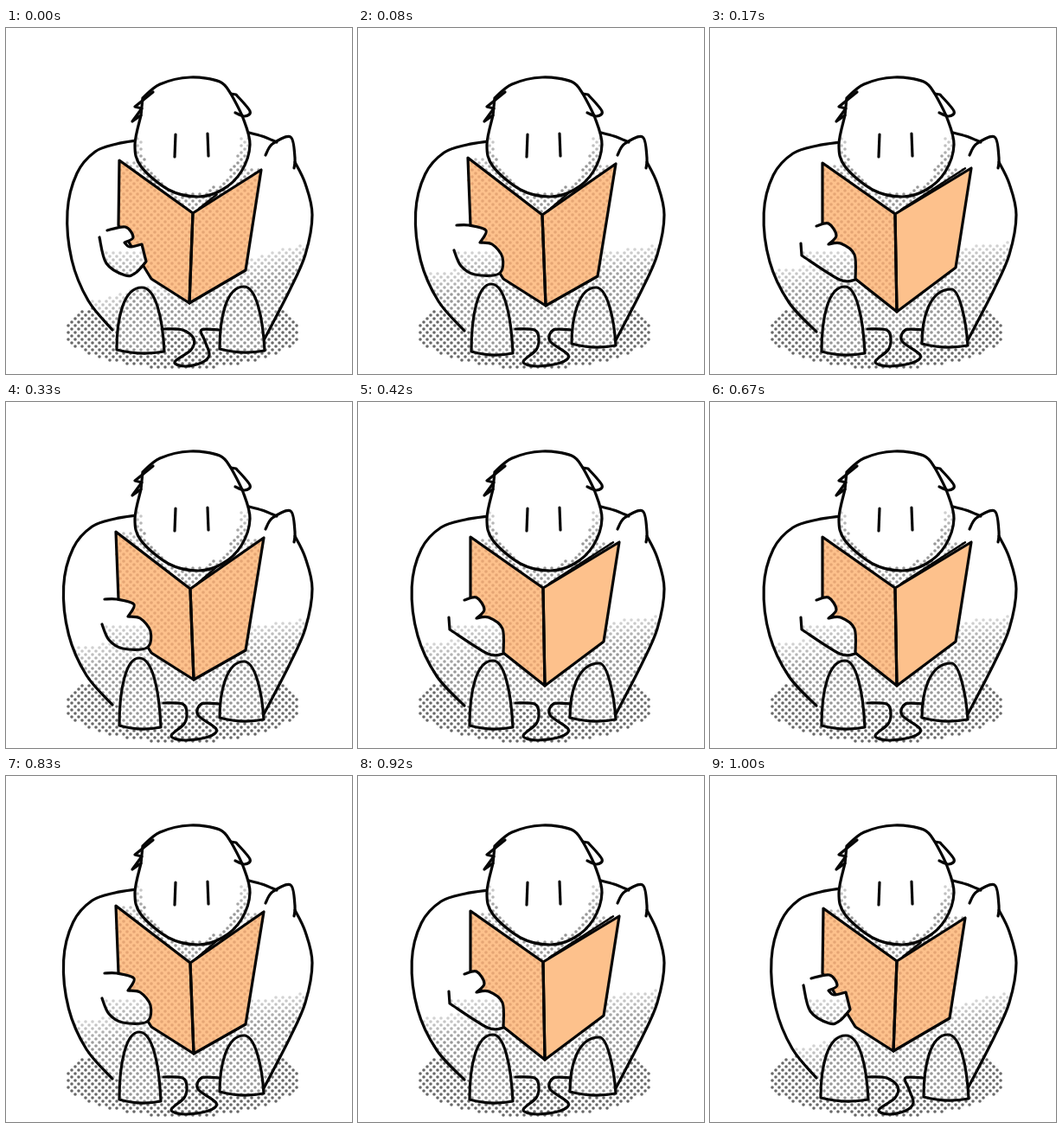
These frames come from a looping animation (400 px wide and 400 px high, 1.08 s). An HTML page with a canvas:

```html
<!DOCTYPE html>
<html lang="en">
<head>
<meta charset="utf-8">
<title>Reading</title>
<style>
html, body { margin: 0; width: 100%; height: 100%; overflow: hidden; background: #fff; }
canvas { display: block; width: 400px; height: 400px; }
</style>
</head>
<body>
<canvas id="stage" width="400" height="400"></canvas>
<script>
const ctx = document.getElementById('stage').getContext('2d');
const INK = '#050505', ORANGE = '#fdc18c', RUST = '#e5a574';
const DARK = '#686868', SOFT = '#979797';
const LOOP = 1080, STEPS = 13;

// lean: belly width, swing: tail spread, shade: [height at the left, slope]
const poses = [
  {
    lean: 0, swing: 0, shade: [318, .27], gap: .35, dots: true,
    book: { left: [131, 153], top: [216, 214], foot: [212, 318], right: [295, 164], low: [277, 280] },
    hand: '117,234 138,230 147,242 137,248 / 143,253 157,250 / 162,270 / 150,283 138,286 116,272 108,242',
    feet: [[128, 183, 300, 374, 157], [247, 299, 299, 373, 275]]
  },
  {
    lean: 1, swing: 1, shade: [282, .12], gap: .35, dots: true,
    book: { left: [127, 150], top: [213, 216], foot: [217, 321], right: [298, 157], low: [277, 287] },
    hand: '114,228 128,228 148,234 141,248 / 155,250 167,265 163,284 135,285 119,275 111,257',
    feet: [[131, 179, 296, 376, 154], [247, 298, 300, 367, 275]]
  },
  {
    lean: 2, swing: 1, shade: [278, .12], gap: .92, dots: false,
    book: { left: [130, 156], top: [214, 215], foot: [216, 328], right: [302, 162], low: [284, 277] },
    hand: '123,229 137,226 146,240 137,250 / 151,249 167,262 168,291 / 150,291 106,263 / 105,249',
    feet: [[129, 179, 299, 376, 156], [245, 298, 302, 367, 279]]
  }
];

const points = text => text.trim().split(/\s+/).map(p => p.split(',').map(Number));
const mix = (a, b, k) => [a[0] + (b[0] - a[0]) * k, a[1] + (b[1] - a[1]) * k];

function smooth(path, run) {
  for (let i = 0; i + 1 < run.length; i++) {
    const b = run[i], c = run[i + 1], a = run[i - 1] || b, d = run[i + 2] || c;
    path.bezierCurveTo(
      b[0] + (c[0] - a[0]) / 6, b[1] + (c[1] - a[1]) / 6,
      c[0] - (d[0] - b[0]) / 6, c[1] - (d[1] - b[1]) / 6, ...c);
  }
}

// Smooth runs; a slash makes a sharp corner
function curve(text) {
  const path = new Path2D();
  let last;
  for (const part of text.split('/')) {
    const run = points(part);
    if (last) run.unshift(last);
    else path.moveTo(...run[0]);
    smooth(path, run);
    last = run[run.length - 1];
  }
  return path;
}

function polygon(...corners) {
  const path = new Path2D();
  corners.forEach(c => path.lineTo(...c));
  path.closePath();
  return path;
}

function oval(x, y, rx, ry) {
  const path = new Path2D();
  path.ellipse(x, y, rx, ry, 0, 0, Math.PI * 2);
  return path;
}

function fill(path, color) {
  ctx.fillStyle = color;
  ctx.fill(path);
}

function ink(path, width = 3.2) {
  ctx.lineWidth = width;
  ctx.stroke(path);
}

// Staggered dots inside a path, fading in below the line top(x)
function tone(path, color, top = () => 0, hole) {
  ctx.fillStyle = color;
  for (let y = 0, row = 0; y < 400; y += 4, row++) {
    for (let x = row % 2 * 4; x < 400; x += 8) {
      const depth = y - top(x);
      if (depth < 0 || !ctx.isPointInPath(path, x, y)) continue;
      if (hole && ctx.isPointInPath(hole, x, y)) continue;
      ctx.globalAlpha = Math.min(1, .4 + depth / 50);
      ctx.beginPath();
      ctx.arc(x, y, 1.8, 0, Math.PI * 2);
      ctx.fill();
    }
  }
  ctx.globalAlpha = 1;
}

const GROUND = oval(204, 350, 136, 44);
const FACE = oval(213, 130, 56, 61);
const HEAD = curve('158,81 178,65 213,57 247,62 260,76 / 274,104 282,135 272,166 250,187 222,195 188,187 156,160 149,135 156,101 / 158,81');
const HAIR = [curve('170,74 149,91 / 157,93 / 146,108 / 156,101'), curve('260,76 266,77 / 282,96 276,102 265,98')];
const SIDE = points('334,155 346,180 354,216 346,262 328,303 298,361');
const BELLY = points('151,130 128,134 103,143 82,168 71,212 76,268 95,315 123,349');
const SHOULDER = [curve('281,121 296,125 313,132'), curve('300,147 308,134 329,126 334,150 333,162')];
const EYES = [curve('196,123 195,149'), curve('233,122 234,148')];

function drawBody({ lean, shade: [level, slope] }) {
  const wide = BELLY.map(([x, y], i) =>
    [x - 4.5 * lean * Math.sin(i / (BELLY.length - 1) * Math.PI), y + lean]);
  const left = new Path2D(), right = new Path2D();
  left.moveTo(...wide[0]);
  smooth(left, wide);
  right.moveTo(...SIDE[0]);
  smooth(right, SIDE);
  const body = new Path2D(left);
  body.lineTo(...SIDE[SIDE.length - 1]);
  smooth(body, [...SIDE].reverse());
  fill(body, '#fff');
  tone(body, SOFT, x => level - (x - 90) * slope);
  [left, right, ...SHOULDER].forEach(s => ink(s));
}

function drawHead({ book }) {
  tone(polygon(book.left, book.top, book.right), SOFT, () => 140);
  fill(HEAD, '#fff');
  tone(HEAD, SOFT, () => 125, FACE);
  [HEAD, ...HAIR, ...EYES].forEach(s => ink(s));
}

function drawBook({ book: { left, top, foot, right, low }, gap, dots }) {
  const cover = polygon(left, top, foot, [168, 290], [130, 228]);
  const page = polygon(top, right, low, foot);
  fill(cover, ORANGE);
  fill(page, ORANGE);
  tone(cover, RUST);
  if (dots) tone(page, RUST);
  ink(cover);
  ink(page);
  const [x, y] = mix(top, right, gap);
  ink(polygon([top[0] + 7, top[1] - 5], [x, y - 4]), 2.5);
}

function drawFoot([l, r, top, base, peak]) {
  const path = new Path2D();
  path.moveTo(l, base - 2);
  path.bezierCurveTo(l, top + 35, l + 8, top, peak, top);
  path.bezierCurveTo(r - 10, top, r - 2, top + 35, r, base);
  path.quadraticCurveTo((l + r) / 2, base + 5, l, base - 2);
  fill(path, '#fff');
  tone(path, SOFT);
  ink(path);
}

function drawTail({ swing }) {
  const waist = 217 - 8 * swing, tip = 195 - 4 * swing, end = 235 + 8 * swing;
  ink(curve(`182,348 204,349 ${waist},359 ${waist - 3},372 ${tip},386 207,391 ${end - 9},387
    ${end},378 ${waist + 13},362 226,349 246,349`));
}

function draw(pose) {
  ctx.fillStyle = '#fff';
  ctx.fillRect(0, 0, 400, 400);
  ctx.strokeStyle = INK;
  ctx.lineCap = ctx.lineJoin = 'round';
  tone(GROUND, DARK);
  drawBody(pose);
  drawHead(pose);
  drawBook(pose);
  const hand = curve(pose.hand);
  fill(hand, '#fff');
  tone(hand, SOFT, () => 258);
  ink(hand);
  pose.feet.forEach(drawFoot);
  drawTail(pose);
}

const start = performance.now();
let shown = -1;
function tick() {
  const t = (performance.now() - start) % LOOP;
  // Steps last a thirteenth of the loop, cut on whole hundredths of a second
  let step = 0;
  while (step < STEPS - 1 && t >= Math.round((step + 1) * LOOP / STEPS / 10) * 10) step++;
  const next = step % poses.length;
  if (next !== shown) draw(poses[shown = next]);
  requestAnimationFrame(tick);
}
tick();
</script>
</body>
</html>
```
